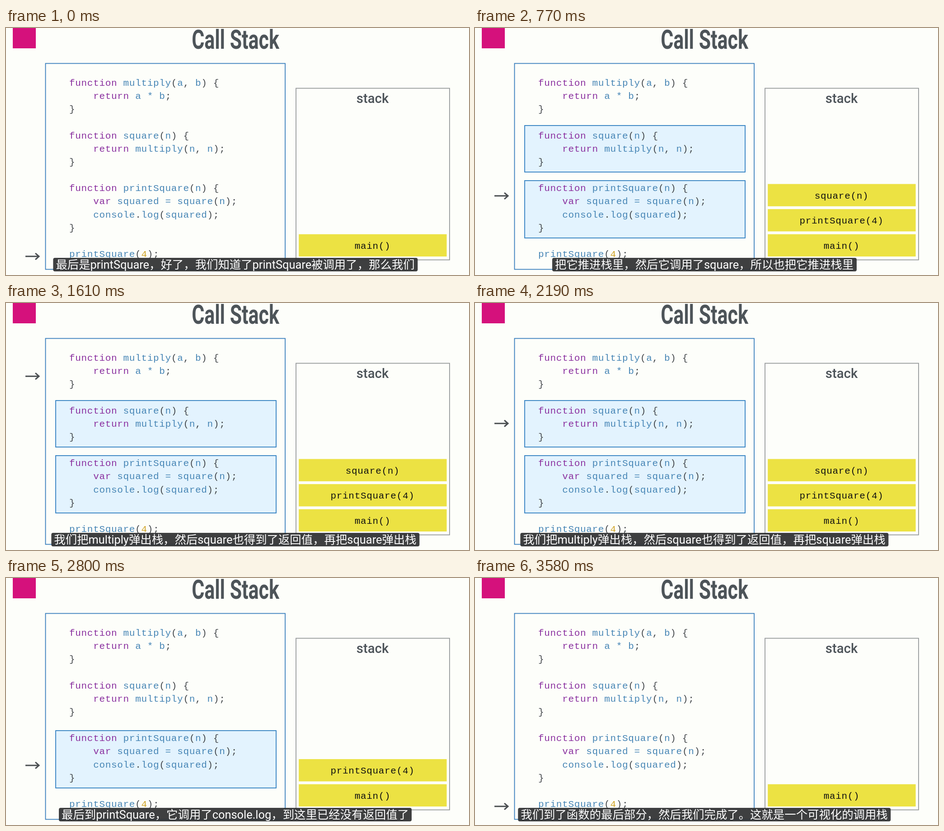
An HTML page for the animation above (3.65 s loop, 1025 by 547 pixels).

```html
<!DOCTYPE html>
<html lang="zh-CN">
<head>
<meta charset="utf-8">
<title>Call Stack</title>
<style>
html, body { margin: 0; width: 100%; height: 100%; overflow: hidden; background: #fdfefa; }
svg { position: absolute; left: 0; top: 0; }
pre, .call { font: 21px "Liberation Mono", monospace; letter-spacing: .68px; }
pre { position: absolute; left: 140px; top: 108px; margin: 0; line-height: 29.15px; color: #42464a; }
.key { color: #8a309f; }
.name { color: #4685b5; }
.num { color: #d0a52a; }
.head { font-family: Roboto, sans-serif; fill: #4d5459; text-anchor: middle; }
.call { text-anchor: middle; fill: #111; }
.block { fill: #e3f3fe; stroke: #2f7fc1; stroke-width: 1.8; }
#caption {
  position: absolute; left: 507.5px; top: 508.5px; transform: translateX(-50%);
  padding: 0 6.5px; border-radius: 4px; white-space: nowrap;
  font: 25.4px/30.5px Roboto, "Noto Sans CJK SC", sans-serif;
  color: #fff; background: rgba(48, 49, 50, .93);
}
</style>
</head>
<body>
<svg width="1025" height="547">
  <rect x="15" width="51" height="45" fill="#d5117c"/>
  <text class="head" transform="translate(508 46) scale(.715 1)" font-size="60" font-weight="700">Call Stack</text>
  <rect x="87.5" y="78.5" width="530.5" height="456" fill="none" stroke="#3a7fbd" stroke-width="1.8"/>
  <rect x="642" y="133.5" width="340" height="380" fill="none" stroke="#96999b" stroke-width="1.8"/>
  <text class="head" x="811.5" y="166" font-size="29.3" font-weight="500">stack</text>
  <g id="levels"></g>
  <path id="arrow" d="M0 0H30M22-7L30 0L22 7" fill="none" stroke="#4b4f52" stroke-width="3"/>
</svg>
<pre id="code">function multiply(a, b) {
    return a * b;
}

function square(n) {
    return multiply(n, n);
}

function printSquare(n) {
    var squared = square(n);
    console.log(squared);
}

printSquare(4);</pre>
<div id="caption"></div>
<script>
const LOOP = 3650, STEP = 78, STEPS = 3, LINE = 29.15;
const $ = id => document.getElementById(id);

// Calls from the bottom up, with top and height of the code block they light up
const calls = [['main()'], ['printSquare(4)', 338, 127], ['square(n)', 216, 103], ['multiply(n, n)', 97, 103]];

// Each scene sets the stack depth and sends the arrow to a code line; captions stay until replaced.
const scenes = [
  { at: 0, depth: 1, line: 13.2, text: '最后是printSquare，好了，我们知道了printSquare被调用了，那么我们' },
  { at: 60, depth: 2, line: 9 },
  { at: 540, depth: 2, line: 9, text: '把它推进栈里，然后它调用了square，所以也把它推进栈里' },
  { at: 770, depth: 3, line: 5 },
  { at: 1080, depth: 4, line: 1.02, text: 'square也调用了multiply，同样也把它推进栈。最后我们得到了multiply的返回值' },
  { at: 1610, depth: 3, line: 5, text: '我们把multiply弹出栈，然后square也得到了返回值，再把square弹出栈' },
  { at: 2340, depth: 2, line: 9, text: '最后到printSquare，它调用了console.log，到这里已经没有返回值了' },
  { at: 2720, depth: 2, line: 10.2 },
  { at: 3410, depth: 1, line: 13.2, text: '我们到了函数的最后部分，然后我们完成了。这就是一个可视化的调用栈' }
];
scenes.forEach((scene, i) => scene.text ??= scenes[i - 1].text);

$('levels').innerHTML = calls.map(([label, top, height], i) => {
  const y = 456.7 - i * 55.6;
  return `<g>${top ? `<rect class="block" x="110" y="${top}" width="488" height="${height}"/>` : ''}
    <rect x="648.2" y="${y}" width="327.4" height="49.3" fill="#ece243"/>
    <text class="call" x="811.5" y="${y + 32.3}">${label}</text></g>`;
}).join('');

$('code').innerHTML = $('code').textContent.replace(/[a-z]+|[*=]|\d/gi, word => {
  const kind = /^(function|return|var)$/.test(word) ? 'key' : /\d/.test(word) ? 'num' : 'name';
  return `<span class="${kind}">${word}</span>`;
});

const ease = p => p < .5 ? 8 * p ** 4 : 1 - 8 * (1 - p) ** 4;

function draw(now) {
  const t = now % LOOP;
  const index = scenes.findLastIndex(scene => scene.at <= t);
  const { at, depth, line, text } = scenes[index];

  [...$('levels').children].forEach((level, i) => {
    level.style.display = i < depth ? '' : 'none';
  });
  if ($('caption').textContent !== text) $('caption').textContent = text;

  // The arrow glides in a few visible steps.
  const from = scenes.at(index - 1).line;
  const step = Math.min(STEPS, Math.floor((t - at) / STEP) + 1);
  const y = 121 + LINE * (from + (line - from) * ease(step / STEPS));
  $('arrow').setAttribute('transform', `translate(43 ${y})`);
}

function loop() {
  draw(performance.now());
  requestAnimationFrame(loop);
}
loop();
</script>
</body>
</html>
```
